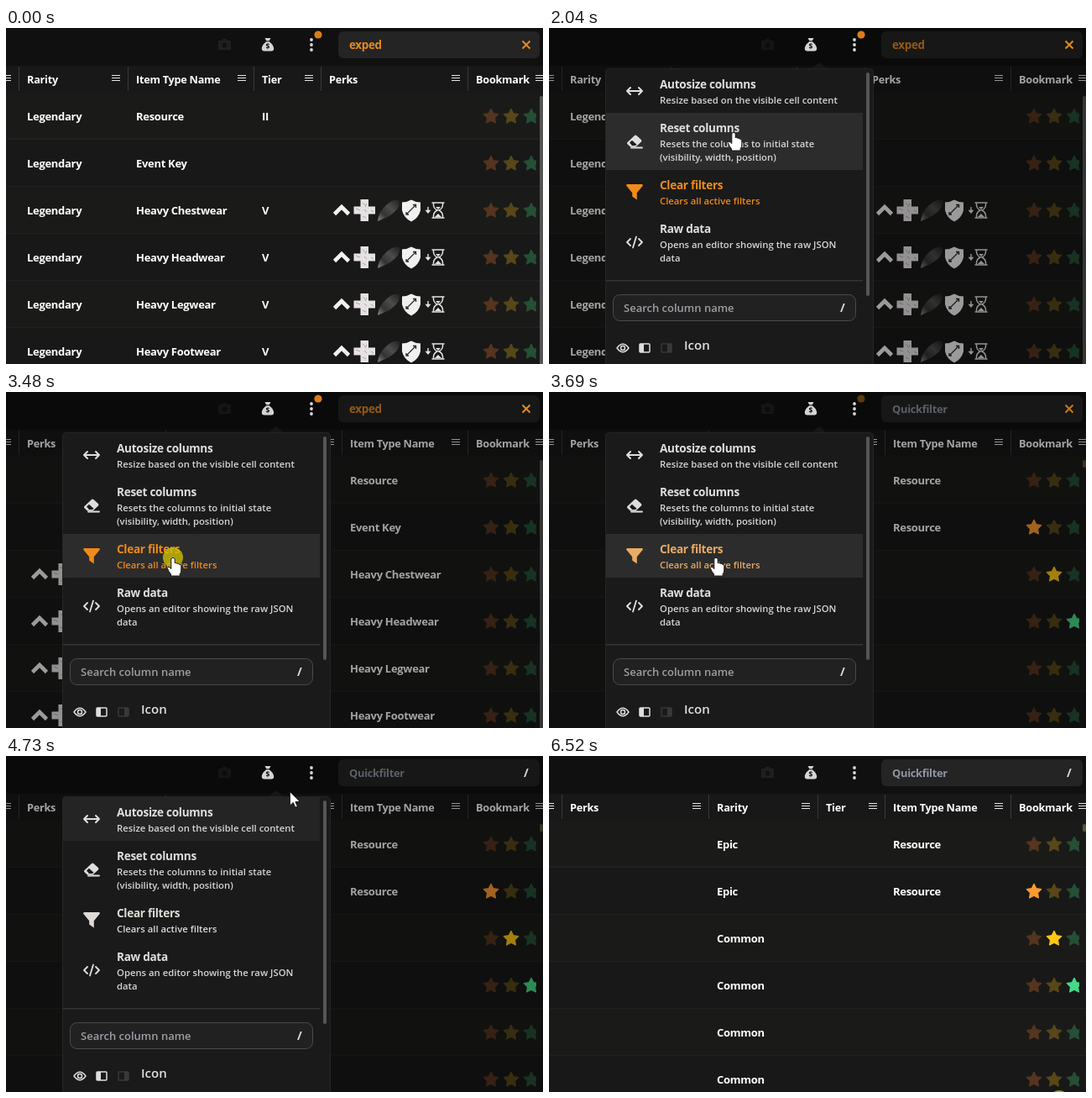
An HTML page that plays this animation: 640 by 400 pixels, repeating every 6.65 s.

```html
<!DOCTYPE html>
<html lang="en">
<head>
<meta charset="utf-8">
<title>Item table</title>
<style>
html, body { margin: 0; width: 100%; height: 100%; overflow: hidden; background: #0f0f0f; }
svg { display: block; width: 100vw; height: 100vh; }
text { font: 700 13px "Open Sans", "Noto Sans", sans-serif; letter-spacing: -.3px; fill: #fff; white-space: pre; }
.head { font-size: 12.7px; letter-spacing: -.25px; }
.title { font-size: 13.6px; fill: #dedede; }
.note { font-size: 11.3px; font-weight: 600; letter-spacing: 0; fill: #d6d6d6; }
.field { font-weight: 600; letter-spacing: 0; fill: #9ca0a5; }
.line { fill: none; stroke: #e0e0e0; stroke-width: 2; stroke-linecap: round; stroke-linejoin: round; }
</style>
</head>
<body>
<svg id="stage" viewBox="0 0 640 400" preserveAspectRatio="none"></svg>
<script>
const LOOP = 6650;
const ORANGE = [240, 138, 24], PALE = [222, 218, 214];
const STAR_DIM = ['#55351f', '#574719', '#254f36'];
const STAR_LIT = ['#ff9a30', '#ffc814', '#48d888'];

// Markup helpers
const rect = (x, y, w, h, fill, more = '') =>
  `<rect x="${x}" y="${y}" width="${w}" height="${h}" fill="${fill}" ${more}/>`;
const path = (d, more = '') => `<path d="${d}" ${more}/>`;
const text = (x, y, s, cls = '', more = '') => `<text x="${x}" y="${y}" class="${cls}" ${more}>${s}</text>`;
const group = (id, body, more = '') => `<g id="${id}" ${more}>${body}</g>`;

const starPoints = Array.from({ length: 10 }, (_, i) => {
  const a = -Math.PI / 2 + i * Math.PI / 5, r = i % 2 ? 4.7 : 9.2;
  return (r * Math.cos(a)).toFixed(2) + ',' + (r * Math.sin(a) + .5).toFixed(2);
}).join(' ');

const stars = (y, lit) => [0, 1, 2].map(i => {
  const color = (i === lit ? STAR_LIT : STAR_DIM)[i];
  return `<polygon points="${starPoints}" transform="translate(${578 + 24 * i} ${y})"
    fill="${color}" stroke="${color}" stroke-width="1.2" stroke-linejoin="round"/>`;
}).join('');

const burger = x => [56, 59, 62].map(y => rect(x - 5, y, 10, 1, '#e4e4e4')).join('');

// Five perk icons, drawn around the middle of the first one
const perks = (x, y) => `<g transform="translate(${x} ${y})">` +
  path('M-8.5 4.5L0-4 8.5 4.5', 'fill="none" stroke="#f2f2f2" stroke-width="4.6"') +
  path('M22.5-13h9.5v8.5h8v9h-8V13h-9.5V4.500h-8v-9h8z', 'fill="#e6e2e4"') +
  path('M25-9l3 3M30-8l-2 4M17-2l5 2M35 0l3 2M25 7l4 2M27-1l3 3', 'stroke="#aaa2a6" stroke-width="1"') +
  path('M43 13Q44 2 53-6T69-12Q70-4 63 2T52 9z', 'fill="url(#smoke)"') +
  path('M83-12.500Q88-9.500 94-9.500V0Q92 9 83 13.500 74 9 72 0V-9.500Q78-9.500 83-12.500z', 'fill="#f0f0f0"') +
  path('M77 5L88-6M85-6.500h3.500V-3M77 2v3h3', 'fill="none" stroke="#2a2a2a" stroke-width="1.3"') +
  path('M103-4V2M101 .500l2 2.500 2-2.500z', 'fill="#e4e4e4" stroke="#e4e4e4" stroke-width="1.4"') +
  path('M107.500-9h15M107.500 9h15M109.500-9V-6Q110-2 114 0 110 2 109.500 6V9M120.500-9V-6Q120-2 116 0 120 2 120.500 6V9',
    'fill="none" stroke="#e4e4e4" stroke-width="1.5"') +
  path('M112-4h6l-3 3zM111 8l4-4 4 4z', 'fill="#e4e4e4"') + '</g>';

function table(id, cols, rows, thumb) {
  let out = burger(1) + burger(636);
  for (const [name, x, menu] of cols)
    out += rect(x - 10, 46, 1, 29, '#3a3a3a') + text(x, 66, name, 'head') + burger(menu);
  rows.forEach((row, i) => {
    const y = 105 + 56 * i;
    out += `<g clip-path="url(#cells)">${stars(y, row.lit)}</g>`;
    for (const [name, x] of cols) {
      if (name === 'Perks') out += row.perks ? perks(x + 15, y) : '';
      else if (row[name]) out += text(x, y + 4.8, row[name]);
    }
  });
  return group(id, out + rect(636, 81, 4, thumb, thumb < 20 ? '#59523f' : '#555', 'rx="1.5"'));
}

const found = ['Resource', 'Event Key', 'Heavy Chestwear', 'Heavy Headwear', 'Heavy Legwear', 'Heavy Footwear']
  .map((type, i) => ({
    Rarity: 'Legendary', 'Item Type Name': type, Tier: ['II', ''][i] ?? 'V', perks: i > 1
  }));
const all = Array.from({ length: 6 }, (_, i) => ({
  Rarity: i < 2 ? 'Epic' : 'Common', 'Item Type Name': i < 2 ? 'Resource' : '', lit: i - 1
}));
const bookmark = ['Bookmark', 560, 636];
const customCols = [['Rarity', 25, 131], ['Item Type Name', 155, 281], ['Tier', 305, 361], ['Perks', 385, 536], bookmark];
const defaultCols = [['Perks', 25, 176], ['Rarity', 200, 306], ['Tier', 330, 386], ['Item Type Name', 410, 536], bookmark];

const base = rect(0, 0, 640, 400, '#101010') + rect(0, 45, 640, 355, '#181818') +
  [0, 1, 2, 3, 4, 5].map(i =>
    (i % 2 ? '' : rect(0, 77 + 56 * i, 640, 56, '#1a1a19')) + rect(0, 132 + 56 * i, 640, 1, '#232323')).join('') +
  path('M253 15h4l1.5-2h4l1.5 2h4v11h-15z', 'fill="#202020"') +
  '<circle cx="260.500" cy="20.500" r="3" fill="#121212"/>' +
  rect(396, 4, 240, 32, '#242424', 'rx="6"') +
  text(409, 24.8, 'exped', '', 'id="query" style="font-size:13.4px;fill:#e68a1e"') +
  text(409, 24.8, 'Quickfilter', '', 'id="hint" style="font-size:12.9px;fill:#8f94a2"');

const toolbar = rect(340, -6, 48, 50, '#313131', 'id="button" rx="6"') +
  path('M308.500 12h7l-1.800 3.200h-3.400z M310.200 16.200h3.600c2.500 1.900 5.400 5 5.400 8.300q0 3-3 3h-8.400q-3 0-3-3c0-3.300 2.900-6.400 5.400-8.300z',
    'fill="#d4d4d4"') +
  text(309.6, 25.3, '$', '', 'style="font-size:8.500px;letter-spacing:0;fill:#111"') +
  [14, 20, 26].map(y => `<circle cx="364" cy="${y}" r="1.900" fill="#d8d8d8"/>`).join('') +
  '<circle id="badge" cx="372" cy="8" r="4.600" fill="#dd7c18"/>' +
  path('M615.500 15.500l9 9m0-9l-9 9', 'id="cross" stroke="#e68a1e" stroke-width="2"') +
  text(617, 25, '/', '', 'id="slash" style="font-size:14px;fill:#dcdcdc"');

const rowBox = (id, y, h) => rect(68, y, 306, h, '#2c2c2c', `id="${id}"`);
const eraser = 'M93.500 136l8.500-8q1.200-1 2.400 0l5.500 5q1.200 1.200 0 2.400l-6.500 6H97l-3.500-3.200q-1.200-1.100 0-2.200z';
const menu = path('M312 49l10-8 10 8z', 'fill="#171717"') +
  rect(67.5, 48.5, 319, 360, '#1a1a1a', 'rx="4" stroke="#252525"') +
  rowBox('rowSize', 49, 52) + rowBox('rowReset', 101, 68) + rowBox('rowClear', 169, 52) +
  path('M93 75h18M97 71l-4 4 4 4M107 71l4 4-4 4', 'class="line"') +
  path(eraser, 'fill="#dedede"') +
  path('M96 136.500l3-2.800 5.500 5-1.500 1.400h-4z', 'fill="#1a1a1a"') +
  path('M98 142.500h13', 'class="line" style="stroke-width:1.800"') +
  path('M93 186h18q1.500.500.600 2l-6.800 8.200v8.300l-5.600-4v-4.300l-6.800-8.200q-.900-1.500.600-2z', 'id="funnel"') +
  path('M97 251l-4 4 4 4M107 251l4 4-4 4M104 248.500l-4 13', 'class="line" style="stroke-width:1.800"') +
  text(132, 72, 'Autosize columns', 'title') +
  text(132, 90, 'Resize based on the visible cell content', 'note') +
  text(132, 124, 'Reset columns', 'title') +
  text(132, 142, 'Resets the columns to initial state', 'note') +
  text(132, 158, '(visibility, width, position)', 'note') +
  text(132, 192, 'Clear filters', 'title', 'id="clearTitle"') +
  text(132, 210, 'Clears all active filters', 'note', 'id="clearNote"') +
  text(132, 244, 'Raw data', 'title') +
  text(132, 262, 'Opens an editor showing the raw JSON', 'note') +
  text(132, 278, 'data', 'note') +
  rect(68, 300, 306, 1.5, '#353535') + rect(378, 53, 4, 266, '#565656', 'rx="2"') +
  rect(76.5, 317.5, 289, 31, '#212121', 'rx="8" stroke="#4b4b4b"') +
  text(89, 338, 'Search column name', 'field') +
  text(347, 338, '/', '', 'id="menuSlash" style="font-size:14px;fill:#dedede"') +
  path('M81 381q7-9.500 14 0q-7 9.500-14 0z', 'class="line" style="stroke-width:1.500"') +
  '<circle cx="88" cy="381" r="2.500" class="line" style="stroke-width:1.500"/>' +
  rect(108, 376, 12, 10, 'none', 'rx="1" stroke="#dedede" stroke-width="1.500"') + rect(108, 376, 5, 10, '#dedede') +
  rect(134, 376, 12, 10, 'none', 'rx="1" stroke="#393939" stroke-width="1.500"') + rect(141, 376, 5, 10, '#393939') +
  text(161, 383, 'Icon', 'field', 'style="font-size:15px;fill:#e0e0e0"');

const pointer = 'fill="#fff" stroke="#161616" stroke-width="1" stroke-linejoin="round"';
const stage = document.getElementById('stage');
stage.innerHTML = `<defs>
  <clipPath id="cells"><rect width="632" height="400"/></clipPath>
  <linearGradient id="smoke" x1="0" y1="1" x2="1" y2="0">
    <stop offset="0" stop-color="#8a8a8a"/><stop offset=".3" stop-color="#333"/>
    <stop offset=".6" stop-color="#4c4c4c"/><stop offset="1" stop-color="#202020"/>
  </linearGradient></defs>` + base +
  table('custom', customCols, found, 330) + table('reset', defaultCols, found, 330) + table('cleared', defaultCols, all, 9) +
  rect(0, 0, 640, 400, '#000', 'id="shade"') + toolbar + group('menu', menu) +
  '<circle id="click" r="12" fill="#cdbf00" fill-opacity=".8"/>' +
  group('cursor',
    path('M0 0V16.500L3.900 12.900 6.300 18.600 9 17.400 6.600 11.900H12z', `id="arrow" ${pointer}`) +
    path('M-2.200 1.500Q0-1.200 2.200 1.500V6.500q1.600-.600 2.600.700 1.600-.600 2.500.900 2.300-.300 2.500 1.800V15q0 3-1.600 4.500V22H-2.500V20Q-5-17-6.800 12.500q.500-2 2.600-.900L-2.200 13.500Z'
      .replace('Q-5-17', 'Q-5 17'), `id="hand" ${pointer}`));

const el = {};
stage.querySelectorAll('[id]').forEach(node => el[node.id] = node);

// Timing helpers
const clamp = v => Math.max(0, Math.min(1, v));
const ramp = (t, a, b) => clamp((t - a) / (b - a));
const pulse = (t, a, b, rise = 100, fall = rise) => ramp(t, a, a + rise) * (1 - ramp(t, b, b + fall));
const during = (t, ...spans) => spans.some(([a, b]) => t >= a && t < b);
const smooth = p => p * p * (3 - 2 * p);
const mix = (a, b, p) => a + (b - a) * p;
const show = (node, on) => node.style.display = on ? '' : 'none';
const fade = (node, v) => node.setAttribute('opacity', v.toFixed(3));

const track = [
  [200, 371, 26], [410, 364, 19], [1220, 364, 19], [1540, 355, 25], [1600, 355, 25], [2010, 220, 124],
  [3130, 220, 124], [3410, 199, 197], [4360, 199, 197], [4860, 366, 12], [5230, 366, 12], [5520, 608, 410]
];
function cursorAt(t) {
  const i = track.findIndex(k => k[0] > t);
  if (i === 0) return track[0].slice(1);
  if (i < 0) return track.at(-1).slice(1);
  const [a, x0, y0] = track[i - 1], [b, x1, y1] = track[i];
  const p = smooth(ramp(t, a, b));
  return [mix(x0, x1, p), mix(y0, y1, p)];
}

function draw(t) {
  show(el.custom, t < 2310);
  show(el.reset, during(t, [2310, 3620]));
  show(el.cleared, t >= 3620);
  show(el.query, t < 3620);
  show(el.hint, t >= 3620);
  fade(el.badge, 1 - ramp(t, 3620, 3740));
  fade(el.cross, 1 - ramp(t, 3640, 3980));
  fade(el.slash, ramp(t, 3740, 4080));

  fade(el.shade, .36 * pulse(t, 1080, 5050, 140, 195));
  fade(el.button, Math.max(pulse(t, 190, 1150, 200, 300), pulse(t, 5060, 5290, 80, 220)));
  fade(el.menu, pulse(t, 1010, 5050, 155, 130));
  fade(el.menuSlash, mix(.6, 1, ramp(t, 1150, 1300)));
  fade(el.rowSize, Math.max(pulse(t, 1730, 1850), pulse(t, 4600, 4690)));
  fade(el.rowReset, Math.max(pulse(t, 1850, 3260), pulse(t, 4490, 4600)));
  fade(el.rowClear, pulse(t, 3260, 4490));

  const p = 1 - (1 - ramp(t, 3620, 4060)) ** 3;
  const tint = `rgb(${ORANGE.map((c, i) => Math.round(mix(c, PALE[i], p)))})`;
  for (const node of [el.funnel, el.clearTitle, el.clearNote]) node.style.fill = tint;

  const [x, y] = cursorAt(t);
  const place = `translate(${x.toFixed(2)} ${y.toFixed(2)})`;
  el.cursor.setAttribute('transform', place);
  el.click.setAttribute('transform', place);
  show(el.cursor, during(t, [200, 5540]));
  const hand = during(t, [200, 1080], [1735, 4690], [5110, 5300]);
  show(el.hand, hand);
  show(el.arrow, !hand);
  show(el.click, during(t, [940, 1080], [2240, 2380], [3480, 3620], [4920, 5060], [6520, LOOP]));
}

const start = performance.now();
function tick() {
  draw((performance.now() - start) % LOOP);
  requestAnimationFrame(tick);
}
tick();
</script>
</body>
</html>
```
